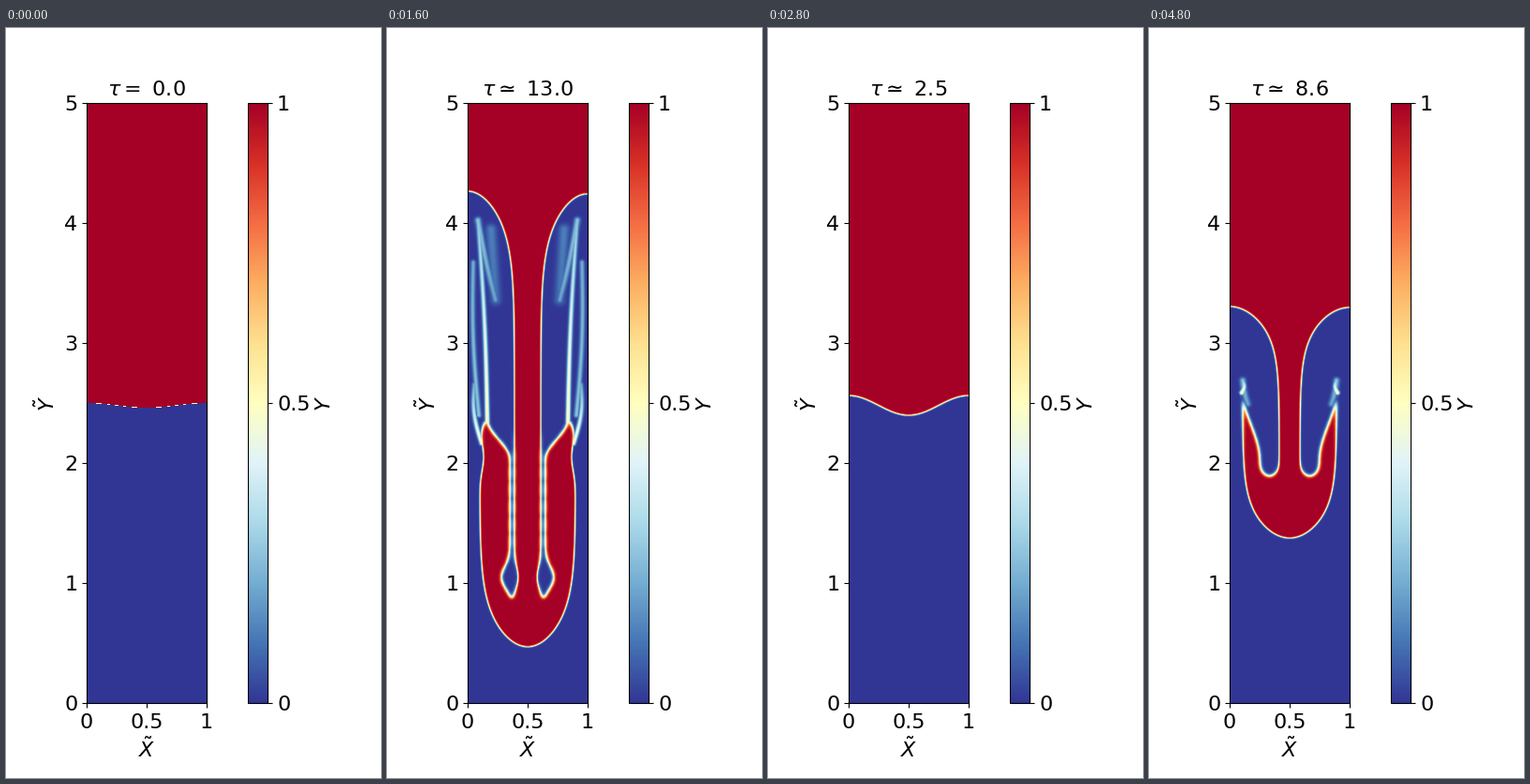
Animation of 400x800 px, one loop 5000 ms. Source, as a matplotlib script:

```python
import numpy as np
import matplotlib.pyplot as plt
from matplotlib.animation import FuncAnimation

plt.rcParams["font.family"] = "DejaVu Sans"
plt.rcParams["font.size"] = 16

W, H, TOP = 128, 640, 80          # field size in pixels, first pixel row
STEP = 0.617                      # time between snapshots
ORDER = [*range(4), *range(17, 27), *range(4, 15)]
GX, GY = np.meshgrid(np.arange(W) + 0.5, TOP + np.arange(H) + 0.5)
STAGES = [8, 14, 17, 21, 25, 26]  # snapshots at which the flow changes pace
EASE = (1 - np.cos(np.linspace(0, np.pi, 80))) / 2


def ramp(k, *values):
    return np.interp(k, STAGES[:len(values)], values)


def bump(y, centre, width):
    return np.exp(-((y - centre) / width) ** 2)


def dome(depth, length):
    """Round cap that turns into a straight wall."""
    return np.sqrt(np.tanh(np.maximum(depth, 0) / length))


def smoothstep(v):
    v = np.clip(v, 0, 1)
    return v * v * (3 - 2 * v)


def lateness(k):
    return np.clip((k - 21) / 4, 0, 1)


def tip(k):
    """Top of the rolled-up horn of red fluid."""
    return ramp(k, 34.5, 13, 14, 21, 2), ramp(k, 425, 385, 392, 418, 360)


def rolled(k, sag, dent_y):
    """Half interface: bubble and stem, blue finger, outer spike wall."""
    top = ramp(k, 361, 297, 254, 174, 87, 81) + sag
    free_fall = ramp(k, 454, 544, 591, 660, 730, 747)
    bottom = 718 - 8 * np.log1p(np.exp((718 - free_fall) / 8))
    tip_x, tip_y = tip(k)
    finger_y = ramp(k, 425, 478, 531, 608, 526)
    neck_y = ramp(k, 435, 460, 485, 460, 475)
    neck = ramp(k, 3, 21, 11, 5, 2)
    bulb = ramp(k, 0, 0, 4, 13, 14)

    def finger(y, side):
        stem = ramp(k, 38, 53, 53, 50, 48) * dome(
            y - top, ramp(k, 26, 44, 58, 60, 36))
        v = smoothstep((y - tip_y) / (neck_y - tip_y))
        gap = neck + (stem - tip_x - neck) * (1 - v)
        swell = bulb * bump(y, finger_y - 22, 16)
        right, left = stem + 0.3 * swell, stem - gap - 0.7 * swell
        half = (right - left) / 2 * dome(finger_y - y, 8)
        return np.column_stack([(left + right) / 2 + side * half, y])

    y = tip_y + (bottom - tip_y) * EASE
    wall = 64 - ramp(k, 30, 50, 50, 51, 50) * dome(
        bottom - y, ramp(k, 14, 44, 45, 56, 18))
    wall += (tip_x - wall) * np.exp((tip_y - y) / ramp(k, 2, 4, 6, 8, 35))
    wall += ramp(k, 0, 0, 4, 4, 5) * bump(
        y, tip_y + ramp(k, 30, 30, 40, 40, 75), 20)
    wall -= 8 * lateness(k) * bump(y, dent_y, 22)
    return np.vstack([finger(top + (finger_y - top) * EASE, 1),
                      finger(finger_y + (tip_y - finger_y) * EASE, -1),
                      np.column_stack([np.maximum(wall, 0), y])])


def half_interface(k, sag=0, dent_y=478):
    """A cosine ripple that grows, then rolls up into the mushroom."""
    curve = rolled(max(k, 8), sag, dent_y)
    if k >= 8:
        return curve
    arc = np.append(0, np.cumsum(np.hypot(*np.diff(curve, axis=0).T)))
    x = 64 * arc / arc[-1]
    amp = 2.5 + 8 * min(1, k / 4) ** 1.3
    ripple = np.column_stack([x, 402.5 - amp * np.cos(2 * np.pi * x / W)])
    return ripple + (curve - ripple) * max(0, (k - 4) / 4) ** 1.3


def coverage(poly):
    """Share of each pixel inside the polygon."""
    nxt = np.roll(poly, -1, axis=0)
    ys = TOP + (np.arange(2 * H) + 0.5) / 2
    hit = (poly[:, 1] <= ys[:, None]) != (nxt[:, 1] <= ys[:, None])
    row, e = np.nonzero(hit)
    run = nxt[e] - poly[e]
    xc = poly[e, 0] + (ys[row] - poly[e, 1]) * run[:, 0] / run[:, 1]
    part = np.clip(np.arange(W) + 1 - xc[:, None], 0, 1) / 2
    out = np.zeros((H, W))
    np.add.at(out, row // 2, np.sign(run[:, 1])[:, None] * part)
    return np.clip(np.abs(out), 0, 1)


def blur(img, sigma):
    r = int(np.ceil(3 * sigma))
    kernel = np.exp(-0.5 * (np.arange(-r, r + 1) / sigma) ** 2)
    kernel /= kernel.sum()
    for axis in (0, 1):
        size = img.shape[axis]
        pad = np.pad(img, [(r, r) if a == axis else (0, 0) for a in (0, 1)],
                     mode="edge")
        img = sum(w * np.take(pad, np.arange(i, i + size), axis)
                  for i, w in enumerate(kernel))
    return img


def stroke(points, width, cols=W):
    """Soft line through (x, y, strength) points."""
    x, y = GX[:, :cols], GY[:, :cols]
    out = np.zeros(x.shape)
    for (x0, y0, v0), (x1, y1, v1) in zip(points[:-1], points[1:]):
        dx, dy = x1 - x0, y1 - y0
        t = ((x - x0) * dx + (y - y0) * dy) / (dx * dx + dy * dy + 1e-9)
        t = np.clip(t, 0, 1)
        d2 = (x - x0 - t * dx) ** 2 + (y - y0 - t * dy) ** 2
        out = np.maximum(out, (v0 + t * (v1 - v0))
                         * np.exp(-d2 / (2 * width**2)))
    return out


def thread(start, end, bow, v0, v1):
    s = np.linspace(0, 1, 16)
    (x0, y0), (x1, y1) = start, end
    return np.column_stack([x0 + (x1 - x0) * s + bow * np.sin(np.pi * s),
                            y0 + (y1 - y0) * s, v0 + (v1 - v0) * s])


def wisps(k):
    """Pale threads drawn up into the blue bubble, on the left half."""
    x, y = tip(k)
    cap = ramp(k, 34, 14, 14, 11, 8), ramp(k, 425, 376, 298, 205, 112)
    trail = ramp(k, 0, 25, 12, 85, 150)
    yield thread((x, y + 4), cap, 2, 0.55, 0.25), 1.6
    yield thread(cap, (cap[0] + 0.22 * trail, cap[1] + trail),
                 -1, 0.25, 0.18), 2.2
    if k > 14:
        rise = ramp(k, 425, 385, 355, 250, 210)
        yield thread((12, y - 5), (6, rise), -3, 0.25, 0.2), 1.8
        yield thread((15, y + 25), (7, y - 38), -4, 0.5, 0.2), 1.6
        yield thread((25, cap[1] + 10), (30, cap[1] + trail), 0, 0.12, 0.1), 4


def filament(mean, swing, turn, period, first, last):
    y = np.linspace(first, last, 24)
    x = mean + swing * np.cos(np.pi * (y - turn) / period)
    return np.column_stack([x, y, np.full(24, 0.24)])


def mirror(half):
    return np.hstack([half, half[:, ::-1]])


def field(k):
    left = half_interface(k)
    right = half_interface(k, sag=max(0, (k - 10) / 4), dent_y=505)
    right = right[::-1] * [-1, 1] + [W, 0]
    mask = coverage(np.vstack([left, right, [(W, 70), (0, 70)]]))
    f = blur(mask, 0.35 + 0.5 * min(1, k / 4))
    f = np.clip(0.5 + (f - 0.5) * (1 + 8 * np.exp(-2 * k)), 0, 1)

    if k > 8:
        # The finger mixes more than the rest of the interface.
        near = np.zeros((H, W // 2))
        for x, y in left[80:160:5]:
            d2 = (GX[:, :64] - x) ** 2 + (GY[:, :64] - y) ** 2
            near = np.maximum(near, np.exp(-d2 / 150))
        near = mirror(near) * min(1, (k - 8) / 6)
        f += near * (blur(mask, 1.8) - f)
        for line, width in wisps(k):
            f = np.maximum(f, mirror(stroke(line, width, W // 2)))

    late = lateness(k)
    if late > 0:
        # Drops and filaments shed into the red fluid.
        fall = 14 * (k - 25)
        for cx, cy, rx, ry in [(50, 603, 5, 36), (41, 655, 6, 22),
                               (88, 629, 15, 17)]:
            r = np.hypot((GX - cx) / rx, (GY - cy - fall) / ry)
            f *= 1 - 0.9 * late * np.exp(-r**4)
        f -= late * stroke(filament(84, 19, 505, 107, 466, 638), 1.8)
        f -= late * stroke(filament(36, -16, 488, 100, 464, 590), 1.8)
    return np.clip(f, 0, 1)


fields = [field(k) for k in ORDER]

fig = plt.figure(figsize=(4, 8), dpi=100)
ax = fig.add_axes([0.215, 0.1, 0.32, 0.8])
image = ax.imshow(fields[0], cmap="RdYlBu_r", vmin=0, vmax=1, aspect="auto",
                  extent=(0, 1, 0, 5), interpolation="nearest")
ax.set_xticks([0, 0.5, 1], ["0", "0.5", "1"])
ax.set_yticks(range(6))
ax.tick_params(axis="x", pad=4.2)
ax.set_xlabel(r"$\tilde{X}$")
ax.set_ylabel(r"$\tilde{Y}$")
title = ax.set_title("", fontsize=16)

cax = fig.add_axes([258 / 400, 0.1, 21.3 / 400, 0.8])
bar = fig.colorbar(image, cax=cax, ticks=[0, 0.5, 1])
bar.ax.set_yticklabels(["0", "0.5", "1"])
bar.set_label("$Y$")


def update(i):
    k = ORDER[i]
    image.set_data(fields[i])
    relation = r"\simeq" if k else "="
    title.set_text(rf"$\tau{relation}$ {k * STEP:.1f}")
    return image, title


anim = FuncAnimation(fig, update, frames=len(ORDER), interval=200, repeat=True)
plt.show()
```
